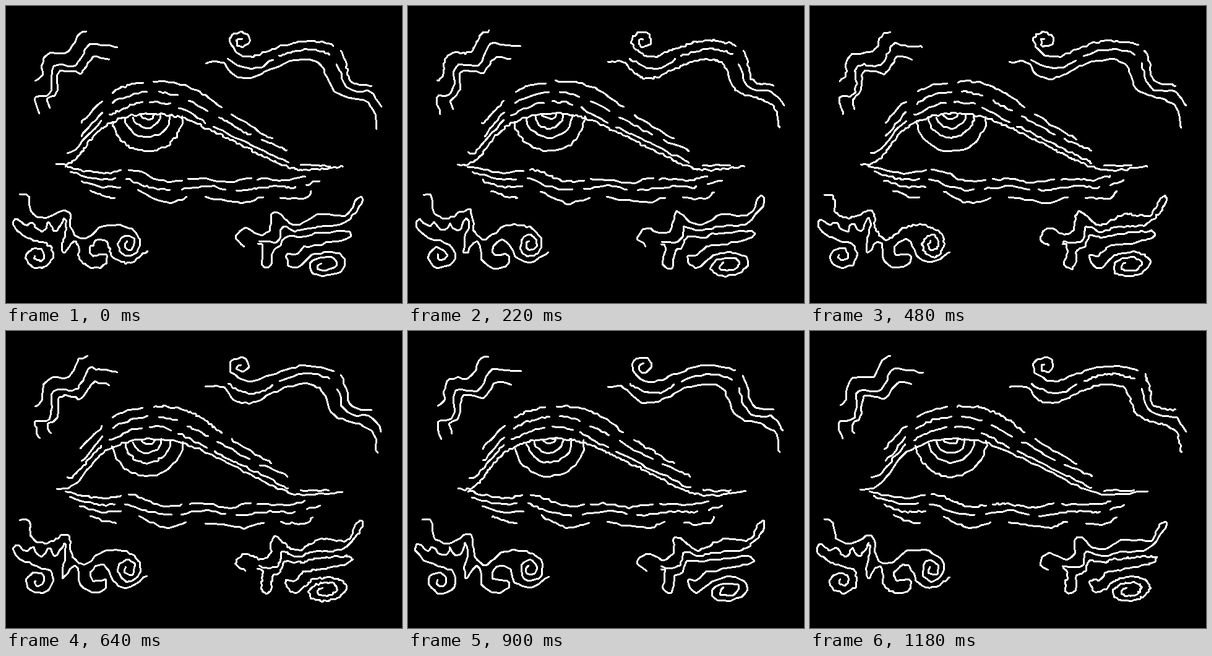
These frames come from a looping animation (640 px wide and 480 px high, 1200 ms). An HTML page:

```html
<!DOCTYPE html>
<html lang="en">
<head>
<meta charset="utf-8">
<title>Wobbling eye</title>
<style>
  html, body { margin: 0; width: 100%; height: 100%; overflow: hidden; background: #000; }
  svg { display: block; width: 640px; height: 480px; }
  path { fill: none; stroke: #fff; stroke-width: 3; stroke-linecap: round; stroke-linejoin: round; shape-rendering: crispEdges; }
</style>
</head>
<body>
<svg viewBox="0 0 640 480"><path id="ink"/></svg>
<script>
const LOOP = 1200, STEP = 20;

const points = text => text.split(" ").map(p => p.split(",").map(Number));

// Catmull-Rom curve, sampled about once per pixel.
function smooth(pts) {
  const out = [];
  for (let i = 0; i < pts.length - 1; i++) {
    const b = pts[i], c = pts[i + 1], a = pts[i - 1] || b, d = pts[i + 2] || c;
    const n = Math.ceil(Math.hypot(c[0] - b[0], c[1] - b[1]));
    for (let j = 0; j < n; j++) {
      const t = j / n;
      out.push([0, 1].map(k => b[k] + t / 2 * (c[k] - a[k] +
        t * (2 * a[k] - 5 * b[k] + 4 * c[k] - d[k] + t * (3 * (b[k] - c[k]) + d[k] - a[k])))));
    }
  }
  out.push(pts[pts.length - 1]);
  return out;
}

// Spiral between two radii and two angles (degrees); an arc if the radii agree.
function spiral(cx, cy, r0, r1, a0, a1, squash = 1, tilt = 0) {
  const n = Math.ceil(Math.abs(a1 - a0) / 15);
  return Array.from({ length: n + 1 }, (_, i) => {
    const t = i / n, a = (a0 + (a1 - a0) * t) * Math.PI / 180, r = r0 + (r1 - r0) * t;
    const x = r * Math.cos(a), y = r * Math.sin(a) * squash;
    return [cx + x * Math.cos(tilt) - y * Math.sin(tilt), cy + x * Math.sin(tilt) + y * Math.cos(tilt)];
  });
}

const strokes = [];
const line = (...parts) =>
  strokes.push(smooth(parts.flatMap(p => typeof p === "string" ? points(p) : p)));

// A curve running left to right, broken by gaps around the given x positions.
function dashed(half, gaps, ...parts) {
  line(...parts);
  let dash = [];
  for (const p of strokes.pop().concat([null])) {
    if (p && !gaps.some(x => Math.abs(p[0] - x) < half)) dash.push(p);
    else if (dash.length) {
      strokes.push(dash);
      dash = [];
    }
  }
}

// Top left zigzags
line("131,41 117,47 101,74 73,76 60,87 57,113 48,121");
line("181,66 146,62 133,62 119,89 107,97 84,95 74,103 74,130 68,144 47,148 54,174");
line("166,86 144,82 134,92 121,109 107,106 86,107 82,140 68,150 72,166");

// Top right curl and waves
dashed(5, [536], spiral(380, 57, 4, 19, 270, -180, 0.9),
  "371,73 397,82 433,69 472,57 505,57 530,64 541,71 549,92 557,121 591,128");
dashed(5, [437, 530], "359,86 385,99 410,99 438,83 480,70 520,76 536,95 544,122 560,136 590,139 607,162");
line("322,91 350,91 370,112 400,115 460,89 507,92 530,136 577,153 594,167 600,197");

// Lid and its folds
line("81,255 95,256 115,245 145,207 175,186 225,174 285,181 365,217 445,256 485,265 545,259");
line("475,257 522,258");
dashed(8, [164, 230, 356], "121,190 158,151 185,133 220,124 270,123 315,140 356,170 430,215");
dashed(8, [163, 237, 286, 334, 403], "122,210 138,192 163,164 195,146 237,138 279,146 334,174 393,207 455,234");
dashed(6, [161, 226, 272, 330], "98,237 110,235 130,212 157,183 187,167 221,156 266,159 330,192 400,226 456,254");

// Iris rings
for (const [r, squash] of [[57, 1], [37, 0.97], [23, 0.95], [12, 0.6]])
  line(spiral(228, 178 - (57 - r) / 15, r, r, 0, 171, squash));

// Rows under the eye
dashed(5, [192, 290, 401], "96,259 155,270 205,265 255,283 315,279 360,285 396,279 455,281 485,275");
dashed(8, [185, 274, 363, 476], "103,268 150,280 193,279 225,291 266,297 325,291 371,298 430,291 468,293 507,282");
dashed(14, [200, 307, 430], "120,282 153,292 187,292 213,298 258,318 307,308 385,318 415,309 480,311 495,300");
line("135,299 158,307 177,310");

// Bottom left
line("23,306 37,306 42,334 65,343 95,329 103,336 107,362 125,377 160,355 195,357",
  spiral(197, 385, 21, 5, -45, 600, 1.1));
line(spiral(51, 404, 4, 27, 200, -410, 0.88),
  "30,372 12,355 17,345 32,355 42,349 52,362 61,363 69,350 75,361 84,362 93,343 97,355",
  "90,390 95,399 107,381 116,384 120,411 140,423 160,418 162,402 141,403 135,393 150,378",
  "164,384 173,405 197,415 227,397");

// Bottom right
line("385,387 371,376 386,359 410,369 426,362 430,337 438,333 458,350 475,353 507,337 550,338 566,311 575,308",
  "573,322 545,352 500,357 470,364 447,357 441,377 430,382 409,381");
line("408,384 416,389 412,418 426,423 432,395 443,390 452,372 475,374 500,368 554,364 552,376",
  "495,387 479,391 468,402 452,403 459,421 473,420",
  spiral(516, 419, 39, 10, -130, 600, 0.56, -0.15));

function random(seed) {
  let s = seed >>> 0;
  return () => {
    s = (s + 0x6D2B79F5) >>> 0;
    let x = Math.imul(s ^ (s >>> 15), s | 1);
    x ^= x + Math.imul(x ^ (x >>> 7), x | 61);
    return ((x ^ (x >>> 14)) >>> 0) / 4294967296;
  };
}

// Redraw a stroke with its own coarseness and a small shake at each joint.
function wobble(curve, rnd) {
  const gap = 3 + rnd() * 6, last = curve.length - 1;
  const count = Math.max(2, Math.round(last / gap));
  const shake = () => (rnd() - 0.5) * 3.4;
  let d = "";
  for (let i = 0; i <= count; i++) {
    const [x, y] = curve[Math.round(last * i / count)];
    d += (i ? "L" : "M") + Math.round(x + shake()) + " " + Math.round(y + shake());
  }
  return d;
}

const ink = document.getElementById("ink");
let shown = -1;
function draw() {
  const tick = Math.floor(performance.now() % LOOP / STEP);
  if (tick !== shown) {
    shown = tick;
    const rnd = random(tick * 7919 + 17);
    ink.setAttribute("d", strokes.map(s => wobble(s, rnd)).join(""));
  }
  requestAnimationFrame(draw);
}
draw();
</script>
</body>
</html>
```
